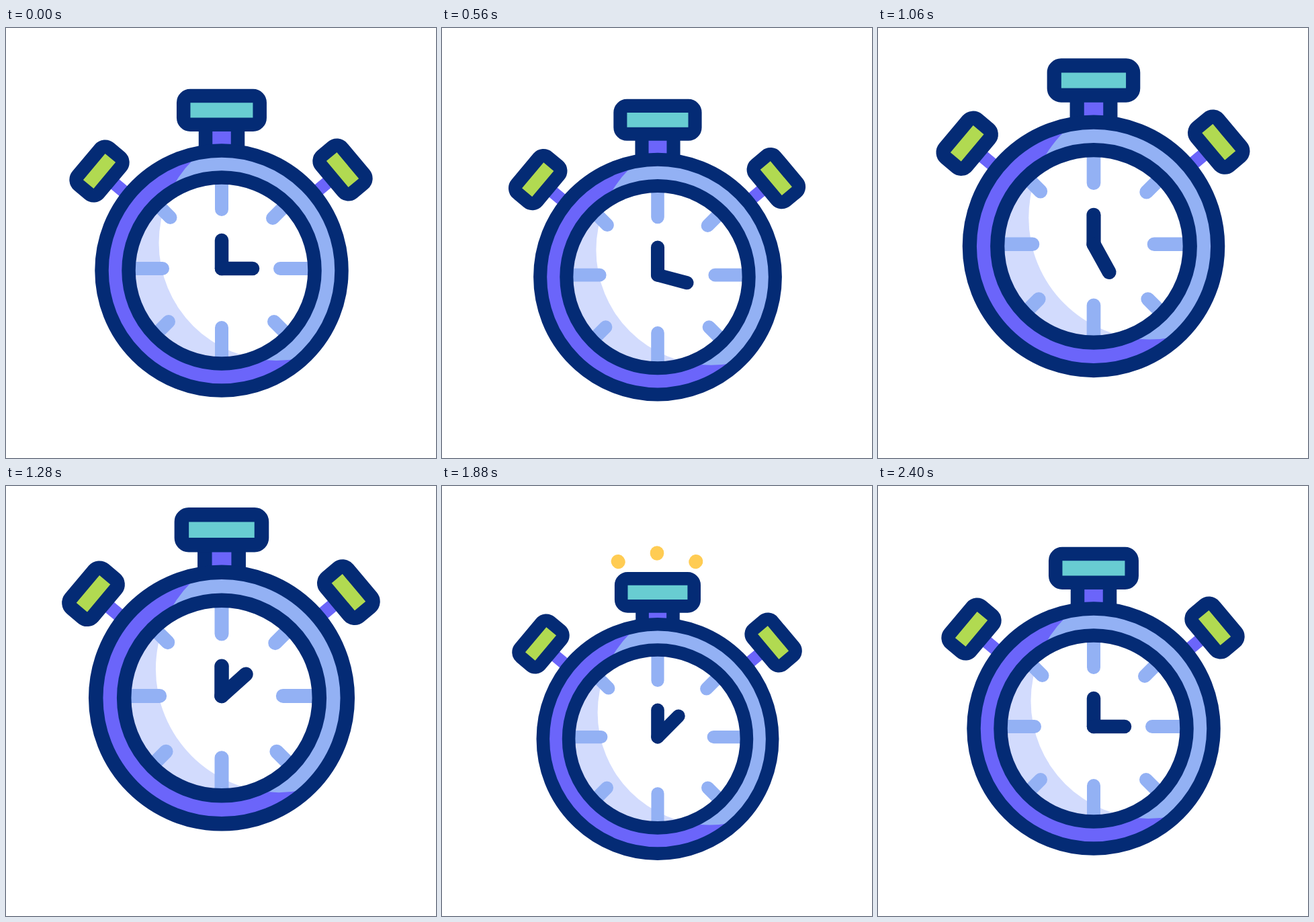
Animation, 640 px wide and 640 px high, one loop 2700 ms. Source, as an HTML page:

```html
<!DOCTYPE html>
<html lang="en">
<head>
<meta charset="utf-8">
<title>Stopwatch</title>
<style>
  html, body { margin: 0; width: 100%; height: 100%; overflow: hidden; background: #fff; }
  svg { display: block; width: 100vw; height: 100vh; }
  .navy { stroke: #042b75; stroke-width: 20.5; stroke-linejoin: round; stroke-linecap: round; }
  .tick { stroke: #93b1f4; stroke-width: 20; stroke-linecap: round; }
  .stem { stroke: #6b65fa; stroke-width: 19; }
  .spark { stroke: #ffcc53; stroke-width: 20.5; stroke-linecap: round; }
</style>
</head>
<body>
<svg viewBox="0 0 640 640">
  <defs>
    <clipPath id="rim"><circle r="178"/></clipPath>
    <clipPath id="face"><circle r="138"/></clipPath>
    <rect id="button" class="navy" fill="#b1da51" x="-35.7" y="-20.3" width="71.4" height="40.6" rx="10"/>
  </defs>
  <g id="sparks"></g>
  <g id="watch">
    <path class="stem" d="M-182-148l60 50M180-150l-60 50"/>
    <g id="crown">
      <path class="navy" fill="#6b65fa" d="M-24-218V-160H24V-218z"/>
      <rect class="navy" fill="#68cdd2" x="-56.8" y="-260" width="113.5" height="42.8" rx="10"/>
    </g>
    <use href="#button" transform="translate(-182 -148) rotate(-50)"/>
    <use href="#button" transform="translate(180 -150) rotate(50)"/>
    <g clip-path="url(#rim)">
      <circle r="178" fill="#6b65fa"/>
      <circle cx="81" cy="-41" r="175" fill="#93b1f4"/>
    </g>
    <g clip-path="url(#face)">
      <circle r="138" fill="#d2dbfd"/>
      <circle cx="81" cy="-41" r="174.5" fill="#fff"/>
      <path class="tick" d="M0-91V-150M0 85V150M-88-3H-150M87-3H150M-76.5-79l-40-40M76-78l40-40M-79 76l-40 40M78 76l40 40"/>
    </g>
    <circle class="navy" fill="none" r="178.5"/>
    <circle class="navy" fill="none" r="138.5"/>
    <path class="navy" d="M0-3V-45"/>
    <path class="navy" id="hand" d="M0-3V-49"/>
  </g>
</svg>
<script>
const LOOP = 2700, STEP = 20;
const $ = id => document.getElementById(id);
const clamp = x => Math.min(1, Math.max(0, x));
const smooth = x => x * x * (3 - 2 * x);
const easeOut = power => x => 1 - (1 - x) ** power;
const span = (t, from, to, ease = smooth) => ease(clamp((t - from) / (to - from)));

// Each move: start, end, value to reach, easing.
const track = (value, ...moves) => t => moves.reduce(
  (v, [from, to, goal, ease]) => v + (goal - v) * span(t, from, to, ease), value);

const shift = track(0, [200, 365, 38.5], [365, 1720, -50.7, easeOut(2.52)],
  [1740, 1920, 25], [1920, 2380, 0, easeOut(2)]);
const scale = track(1, [200, 365, .95], [365, 1720, 1.061, easeOut(2)],
  [1760, 1910, .944], [1920, 2380, 1, easeOut(2)]);

// Swings back a little, then makes five turns.
const spin = u => u * (-.471 + u * (3.763 + u * (-2.638 + u * .346)));

const presses = [{ at: 245, y: 108 }, { at: 1822, y: 100.5 }];
const pressed = t => presses.reduce((sum, { at }) =>
  sum + 17 * (span(t, at, at + 100) - span(t, at + 140, at + 260)), 0);

const rays = [-1, 0, 1].map(side => {
  const el = document.createElementNS("http://www.w3.org/2000/svg", "line");
  el.setAttribute("class", "spark");
  $("sparks").append(el);
  const a = side * 36.6 * Math.PI / 180;
  return { el, x: 320 + side * 57.5, y: side ? 12.5 : 0, dx: Math.sin(a), dy: -Math.cos(a) };
});

function drawSparks(t) {
  const p = presses.find(({ at }) => t > at + 45 && t < at + 285);
  $("sparks").style.display = p ? "" : "none";
  if (!p) return;
  const tip = 57 * span(t, p.at + 45, p.at + 205);
  const tail = 57 * span(t, p.at + 135, p.at + 285);
  for (const r of rays) {
    [tail, tip].forEach((len, i) => {
      r.el.setAttribute("x" + (i + 1), r.x + r.dx * len);
      r.el.setAttribute("y" + (i + 1), p.y + r.y + r.dy * len);
    });
  }
}

function draw(now) {
  const time = now % LOOP, t = time - time % STEP;
  $("watch").setAttribute("transform", `translate(321 ${361 + shift(t)}) scale(${scale(t)})`);
  $("crown").setAttribute("transform", `translate(0 ${pressed(t)})`);
  $("hand").setAttribute("transform", `rotate(${90 + 1800 * span(t, 220, 2400, spin)} 0 -3)`);
  drawSparks(t);
}

const start = performance.now();
function frame() {
  draw(performance.now() - start);
  requestAnimationFrame(frame);
}
frame();
</script>
</body>
</html>
```
